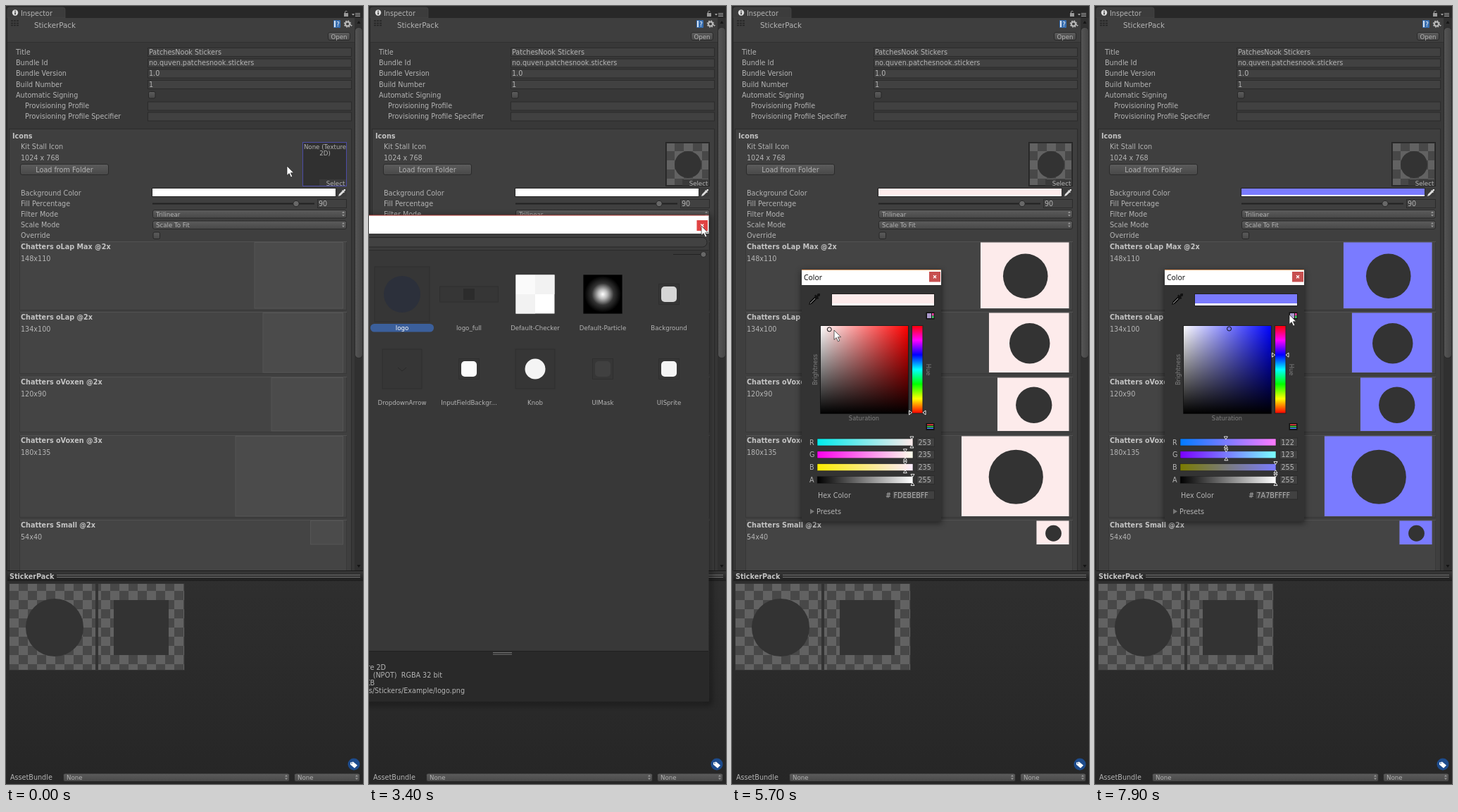
An HTML page for the animation above (8000 ms loop, 507 by 1104 pixels).

```html
<!DOCTYPE html>
<html lang="en">
<head>
<meta charset="utf-8">
<title>Sticker pack inspector</title>
<style>
html, body { margin: 0; width: 100%; height: 100%; overflow: hidden; background: #282828; }
svg { display: block; width: 100vw; height: 100vh; }
text { font: 9.65px "DejaVu Sans", sans-serif; fill: #b4b4b4; white-space: pre; }
.b { font-weight: bold; fill: #c4c4c4; }
.s { font-size: 8.65px; }
.d { font-size: 8.3px; fill: #808080; }
.h { font-size: 10.3px; }
.w { font: 10.4px "Open Sans", sans-serif; fill: #000; }
</style>
</head>
<body>
<svg id="stage" viewBox="0 0 507 1104" preserveAspectRatio="none" xmlns="http://www.w3.org/2000/svg"></svg>
<script>
const LOOP = 8000, STEP = 100;
const stage = document.getElementById('stage');
const $ = id => document.getElementById(id);
const set = (id, attrs) => { for (const k in attrs) $(id).setAttribute(k, attrs[k]); };

// Markup helpers; text is placed by its vertical middle.
const rect = (x, y, w, h, fill, more = '') =>
  `<rect x="${x}" y="${y}" width="${w}" height="${h}" fill="${fill}" ${more}/>`;
const disc = (x, y, r, fill, more = '') => `<circle cx="${x}" cy="${y}" r="${r}" fill="${fill}" ${more}/>`;
const path = (d, fill, more = '') => `<path d="${d}" fill="${fill}" ${more}/>`;
const text = (x, y, s, cls = '', more = '') => `<text x="${x}" y="${y + 3.5}" class="${cls}" ${more}>${s}</text>`;
const mid = 'text-anchor="middle"';
const edge = c => `stroke="${c}"`;
const grad = (id, stops, dir = 'x2="0" y2="1"') => `<linearGradient id="${id}" ${dir}>` +
  stops.map((c, i) => `<stop offset="${i / (stops.length - 1)}" stop-color="${c}"/>`).join('') + '</linearGradient>';
const group = (id, body) => `<g id="${id}">${body}</g>`;

const field = (x, y, w, s = '') => rect(x + .5, y - 5.5, w - 1, 12, '#414141', edge('#2b2b2b')) + text(x + 2, y, s);
const button = (x, y, w, h, s, cls = '') =>
  rect(x + .5, y + .5, w - 1, h - 1, 'url(#btn)', 'rx="2.5" ' + edge('#2a2a2a')) + text(x + w / 2, y + h / 2, s, cls, mid);
const popup = (x, y, w, s) => rect(x + .5, y - 5.5, w - 1, 11.5, 'url(#btn)', 'rx="2.5" ' + edge('#292929')) +
  text(x + 5, y, s, 's') + path(`M${x + w - 7} ${y - 1}l2 -2.5 2 2.5zm0 2l2 2.5 2 -2.5z`, '#999');
const check = (x, y) => rect(x + .5, y - 4.5, 9.5, 9.5, 'url(#btn)', 'rx="2" ' + edge('#272727'));
const closeBox = (id, x, y, w, h) => rect(x, y, w, h, '#c75050', `id="${id}"`) +
  path(`M${x + w / 2 - 2} ${y + h / 2 - 2}l4 4m0 -4l-4 4`, 'none', edge('#fff') + ' stroke-width="1.2"');
const dropper = (x, y, k, c) => path('M0 10l1 -3 5 -5 2 2 -5 5zM5 2l1 -1 1 1 1 -2 2 0 0 2 -2 1 1 1 -1 1z', c,
  `transform="translate(${x} ${y}) scale(${k})"`);

const defs = '<defs>' +
  grad('btn', ['#5c5c5c', '#484848']) + grad('thumb', ['#555', '#454545'], 'x2="1"') +
  grad('bar', ['#3a3a3a', '#1f1f1f']) + grad('pane', ['#2f2f2f', '#262626']) +
  grad('hue', ['#f00', '#f0f', '#00f', '#0ff', '#0f0', '#ff0', '#f00']) +
  '<linearGradient id="dark" x2="0" y2="1"><stop stop-opacity="0"/><stop offset="1"/></linearGradient>' +
  ['sat', 'gR', 'gG', 'gB', 'gA'].map(id => `<linearGradient id="${id}"><stop id="${id}0"/><stop id="${id}1" offset="1"/></linearGradient>`).join('') +
  '<radialGradient id="glow"><stop stop-color="#fff"/><stop offset=".25" stop-color="#bbb"/><stop offset=".6" stop-color="#333"/><stop offset="1"/></radialGradient>' +
  `<pattern id="tiles" width="26" height="26" patternUnits="userSpaceOnUse" x="5" y="817">${rect(0, 0, 26, 26, '#484848')}${rect(0, 0, 13, 13, '#626262')}${rect(13, 13, 13, 13, '#626262')}</pattern>` +
  '<filter id="soft" x="-10%" y="-10%" width="120%" height="120%"><feGaussianBlur stdDeviation="4"/></filter></defs>';

const rows = [['Title', 65, 'PatchesNook Stickers'], ['Bundle Id', 80.5, 'no.quven.patchesnook.stickers'],
  ['Bundle Version', 95.5, '1.0'], ['Build Number', 111, '1']];

// label, size, panel top, panel bottom, preview left, preview bottom
const icons = [['oLap Max @2x', '148x110', 334, 431, 353, 429], ['oLap @2x', '134x100', 434, 521, 365, 520],
  ['oVoxen @2x', '120x90', 526, 604, 377, 603], ['oVoxen @3x', '180x135', 609, 725, 326, 724],
  ['Small @2x', '54x40', 729, 801, 432.5, 764]];

function iconPanel([label, size, top, end, left, low]) {
  const y = top + 1.5, w = 478.5 - left, h = low - y;
  return rect(19.5, top + .5, 464, end - top, '#444', edge('#383838')) + path(`M20 ${top + .5}h464`, 'none', edge('#515151')) +
    text(21, top + 7, 'Chatters ' + label, 'b') + text(21, top + 24, size) +
    rect(left, y, w, h, '#4b4b4b', edge('#555')) +
    `<g class="art">${rect(left, y, w, h, '#fff', 'class="tint"')}${disc(left + w / 2 + 1, y + h / 2 + 1, h * .34, '#333')}</g>`;
}

function inspector() {
  return rect(0, 0, 507, 1104, '#282828') + rect(2, 17, 505, 785, '#383838') +
    path('M2 17V5q0 -3 3 -3H81q3 0 3 3V17z', '#3c3c3c', edge('#4a4a4a') + ' stroke-width=".6"') +
    disc(13, 9.5, 4.2, '#ddd') + rect(12.3, 8.8, 1.5, 3.4, '#333') + rect(12.3, 6.7, 1.5, 1.4, '#333') + text(21, 10, 'Inspector') +
    rect(480, 10, 6, 5, '#999') + path('M481.5 10v-2q1.5 -2 3 0', 'none', edge('#999')) +
    path('M491 11h4l-2 2.5z', '#aaa') + path('M496 10.5h7m-7 2h7m-7 2h7', 'none', edge('#999')) +
    rect(2, 17, 493, 34, '#3e3e3e') + path('M2 51.5H495', 'none', edge('#313131')) +
    path('M7 21h12M7 24.5h12M7 27.5h12', 'none', edge('#252525') + ' stroke-dasharray="3 1" stroke-width="1.6"') +
    text(40, 27, 'StickerPack', 'h') +
    rect(465, 20, 10, 11, '#376eb0', 'rx="1"') + rect(466, 21, 2, 9, '#d8e2ee') + text(471.5, 25, '?', 's', mid + ' style="fill:#fff"') +
    disc(485, 25.5, 3, 'none', 'stroke="#bbb" stroke-width="2"') + disc(485, 25.5, 4.5, 'none', 'stroke="#bbb" stroke-width="1.4" stroke-dasharray="1.8 1.73"') +
    path('M489 27h3l-1.5 2z', '#bbb') + button(457, 37, 32, 12, 'Open', 's') +
    rows.map(([a, y, b]) => text(14, y, a) + field(201, y, 290, b)).join('') +
    text(14, 126, 'Automatic Signing') + check(202, 126) +
    text(27, 141.5, 'Provisioning Profile') + field(201, 141.5, 290) +
    text(27, 156.5, 'Provisioning Profile Specifier') + field(201, 156.5, 290) +
    rect(4.5, 174.5, 486, 640, '#3f3f3f', edge('#2c2c2c')) + text(9, 184, 'Icons', 'b') +
    text(21, 199.5, 'Kit Stall Icon') + text(21, 215, '1024 x 768') + button(20, 224, 126, 16, 'Load from Folder') +
    rect(421, 193, 63, 63, '#303030') +
    group('slotNone', text(453, 199, 'None (Texture', 's', mid) + text(453, 208.5, '2D)', 's', mid)) +
    group('slotArt', rect(423, 195, 59, 59, 'url(#tiles)') + disc(453, 225, 19, '#333')) +
    rect(445, 246, 38, 9, '#3a3a3a') + text(468, 251, 'Select', 's', mid) +
    rect(421.5, 193.5, 62, 62, 'none', 'id="slotEdge"') +
    text(21, 265, 'Background Color') + rect(207.5, 258.5, 261, 12, '#fff', edge('#222')) + rect(208, 259, 260, 9, '#fff', 'class="tint"') +
    rect(468.5, 258.5, 15, 12, '#3a3a3a') + dropper(472, 260, 1, '#ddd') +
    text(21, 280, 'Fill Percentage') + path('M208 280.5H438', 'none', 'stroke="#222" stroke-width="2"') + disc(412, 280.5, 4.2, '#686868', edge('#272727')) + field(442, 280, 42, '90') +
    text(21, 295.5, 'Filter Mode') + popup(208, 295, 276, 'Trilinear') +
    text(21, 310.5, 'Scale Mode') + popup(208, 310.5, 276, 'Scale To Fit') +
    text(21, 325.5, 'Override') + check(208.5, 325.5) + icons.map(iconPanel).join('') +
    rect(495, 17, 12, 785, '#303030') + rect(495.5, 30.5, 11, 469, 'url(#thumb)', 'rx="5" ' + edge('#292929')) +
    path('M498.500 25l2.500 -4 2.500 4zM498.500 793l2.500 4 2.500 -4z', '#151515');
}

function preview() {
  return rect(0, 801, 507, 303, 'url(#pane)') + rect(2, 801, 505, 15, 'url(#bar)') + path('M2 801.500H507', 'none', edge('#191919')) +
    text(5, 809, 'StickerPack', 'b') + path('M72 807.500H503M72 810.500H503', 'none', edge('#737373')) +
    rect(4, 819, 250, 124, '#333') + rect(5, 820, 122, 122, 'url(#tiles)') + rect(131, 820, 122, 122, 'url(#tiles)') +
    disc(69, 882, 41, '#333') + rect(153, 843, 78, 78, '#333') +
    disc(494, 1076, 8.500, '#1d4b8c') + path('M489 1073.500l4 -1 6 5 -4 4 -6 -5z', '#fff') + disc(491, 1074.500, .8, '#1d4b8c') +
    text(6, 1094.500, 'AssetBundle') + popup(81, 1094.500, 322, 'None') + popup(409, 1094.500, 94, 'None');
}

const cols = [47, 142, 236, 332, 426];
function cell(i, name, half, art) {
  const x = cols[i % 5], y = i < 5 ? 409 : 515;
  return rect(x - half, y - half, 2 * half, 2 * half, '#363636', edge('#2f2f2f')) + art(x, y) +
    text(x, y + 47.500, name, 's', mid + (i ? '' : ' id="pickName"'));
}
const chip = (fill, r = 11) => (x, y) => rect(x - r, y - r, 2 * r, 2 * r, fill, 'rx="5"');

function picker() {
  const items = [
    ['logo', 39, (x, y) => disc(x, y, 26, '#2c2c2c', 'id="pickMark"')],
    ['logo_full', 0, (x, y) => rect(x - 41.500, y - 11, 83, 22, '#363636', edge('#2f2f2f')) + rect(x - 8, y - 8, 16, 16, '#2c2c2c')],
    ['Default-Checker', 27.500, (x, y) => rect(x - 27.500, y - 27.500, 55, 55, '#fff') + rect(x - 27.500, y - 27.500, 27.500, 27.500, '#fafafa') + rect(x - 27.500, y, 27.500, 27.500, '#f2f2f2') + rect(x, y - 27.500, 27.500, 27.500, '#f2f2f2')],
    ['Default-Particle', 27.500, (x, y) => rect(x - 27.500, y - 27.500, 55, 55, '#000') + disc(x, y, 26, 'url(#glow)')],
    ['Background', 14.500, chip('#d6d6d6')],
    ['DropdownArrow', 28, (x, y) => path(`M${x - 6} ${y - 2}l6 5 6 -5`, 'none', edge('#2a2a2a'))],
    ['InputFieldBackgr...', 14.500, chip('#fcfcfc')],
    ['Knob', 28, (x, y) => disc(x, y, 14.500, '#f4f4f4')],
    ['UIMask', 14.500, chip('#404040')],
    ['UISprite', 14.500, chip('#f4f4f4')]];
  return rect(-20, 300, 504, 689, 'none', 'stroke="#000" stroke-width="5" opacity=".5" filter="url(#soft)"') +
    group('pickBody', rect(0, 323, 482.500, 664, '#383838') + rect(0, 323, 482.500, 23, '#3c3c3c') +
      rect(-20, 328.500, 500, 13.500, '#424242', 'rx="6.500" ' + edge('#262626')) + path('M0 346.500H482', 'none', edge('#2a2a2a')) +
      path('M432 352.500H480', 'none', edge('#222')) + disc(475, 352.500, 4, '#686868', edge('#272727')) +
      rect(2, 451, 90, 11.500, '#3b5f9b', 'rx="5.500" id="pickPill"') +
      items.map((a, i) => cell(i, ...a)).join('') +
      rect(0, 916, 482.500, 71, '#292929') + path('M0 915.500H482', 'none', edge('#202020')) + path('M176 917.500h27m-27 2.500h27', 'none', edge('#777')) +
      group('pickInfo', [['Texture 2D', 24, 938.500], ['(NPOT)  RGBA 32 bit', 104, 949.500], ['KB', 8, 960.500], ['Assets/Stickers/Example/logo.png', 136, 971.500]]
        .map(([s, x, y]) => text(x, y, s, '', 'text-anchor="end"')).join(''))) +
    rect(0, 297, 482.500, 26, '#fff') + path('M0 297H482.500', 'none', edge('#b03a34')) + closeBox('pickClose', 465.500, 304, 15.500, 15);
}

const chans = ['R', 'G', 'B', 'A'];
function colorWindow() {
  const bars = chans.map((c, i) => {
    const y = 619 + i * 17.800;
    return text(110, y, c) + rect(121, y - 5, 136, 10, `url(#g${c})`, 'stroke="#222" stroke-width=".6"') +
      path('M-2.500 -8h5l-2.500 4zM-2.500 8h5l-2.500 -4z', '#222', `id="t${c}" stroke="#fff" stroke-width=".9"`) +
      rect(262.500, y - 6, 25, 12, '#414141', edge('#2b2b2b')) + text(264.500, y, '', '', `id="n${c}"`);
  }).join('');
  const mini = y => rect(275.500, y, 12, 10, '#111');
  return rect(98, 376, 200, 358, '#000', 'opacity=".5" filter="url(#soft)"') + rect(99, 374, 198, 357.500, '#333') +
    rect(99, 374, 198, 22, '#fff') + path('M99 374.500H297', 'none', edge('#e39a63')) + text(102, 385, 'Color', 'w') + closeBox('colClose', 280, 377, 16, 14.500) +
    dropper(109, 408, 1.600, '#111') + path('M111 422l7 -7', 'none', edge('#aaa')) +
    rect(141.500, 408.500, 146, 17, '#fff', edge('#222')) + rect(142, 409, 145, 13, '#fff', 'class="tint"') +
    mini(434.500) + rect(277, 436, 6, 7, '#a9c') + rect(284, 436, 2.500, 3.500, '#f4a') + rect(284, 439.500, 2.500, 3.500, '#4c6') +
    rect(125.500, 453.500, 125, 125, 'url(#sat)', edge('#222')) + rect(125.500, 453.500, 125, 125, 'url(#dark)') +
    disc(0, 0, 3, 'none', 'id="ring" stroke="#111"') +
    rect(255.500, 453.500, 15.500, 124.500, 'url(#hue)', edge('#222')) +
    path('M251.500 -3v6l4 -3zM275 -3v6l-4 -3z', '#222', 'id="huePin" stroke="#fff" stroke-width=".9"') +
    text(0, 0, 'Brightness', 'd', mid + ' transform="translate(117.500 516) rotate(-90)"') +
    text(0, 0, 'Hue', 'd', mid + ' transform="translate(279.500 516) rotate(90)"') + text(187.500, 584.500, 'Saturation', 'd', mid) +
    mini(592) + ['#f44', '#4d4', '#48f'].map((c, i) => rect(277, 593.500 + i * 2.500, 9, 1.500, c)).join('') + bars +
    text(122, 694, 'Hex Color') + text(218, 694, '#') + rect(227.500, 688, 60, 12, '#414141', edge('#2b2b2b')) + text(229.500, 694, '', '', 'id="hex"') +
    path('M111 713.500v7.500l6 -3.700z', '#777') + text(120, 717.500, 'Presets');
}

stage.innerHTML = defs + inspector() + preview() + group('picker', picker()) + group('colors', colorWindow()) +
  path('M0 0V13.500L3.200 10.600 5.600 16 7.800 15 5.400 9.800H9.600z', '#fff', 'id="cursor" stroke="#222" stroke-width=".7"');

// time, x, y of the pointer
const moves = [[0, 399, 227], [400, 440, 223], [700, 457, 228], [1200, 457, 228], [1500, 470, 255], [2000, 470, 255],
  [2700, 45, 413], [2900, 45, 413], [3300, 468, 305], [3400, 472, 312], [3600, 480, 313], [3800, 477, 311], [3900, 475, 310], [4300, 401, 264],
  [4600, 401, 264], [5000, 190, 554], [5300, 130, 459], [5400, 130, 459], [5700, 145, 460], [5900, 156, 459], [6100, 253, 517],
  [6200, 253, 517], [6400, 263, 495], [6600, 263, 495], [6900, 155, 459], [7100, 174, 460], [7400, 190, 458], [7500, 190, 458],
  [7600, 196, 540], [7700, 265, 555], [7800, 291, 398], [7900, 276, 438]];
// time, saturation, brightness
const shades = [[5400, 0, 1], [5700, .071, .992], [5900, .2, 1], [6900, .2, 1], [7100, .382, .984], [7400, .522, 1]];

function at(keys, t) {
  const i = keys.findIndex(k => k[0] > t);
  if (i < 0) return keys[keys.length - 1].slice(1);
  if (!i) return keys[0].slice(1);
  const a = keys[i - 1], b = keys[i], p = (t - a[0]) / (b[0] - a[0]);
  return a.slice(1).map((v, j) => v + (b[j + 1] - v) * p);
}
const hsv = (h, s, v) => [5, 3, 1].map(n => {
  const k = (n + h * 6) % 6;
  return Math.round(255 * v * (1 - s * Math.max(0, Math.min(k, 4 - k, 1))));
});
const css = c => `rgb(${c.slice(0, 3).join()})`;
const show = (id, on) => set(id, { visibility: on ? 'inherit' : 'hidden' });

function draw(t) {
  const [x, y] = at(moves, t), [s, v] = at(shades, t);
  const hue = t >= 6600 ? .665 : 0;
  const rgba = [...hsv(hue, s, v), 255];
  const picked = t >= 2800, color = t >= 4500;

  set('cursor', { transform: `translate(${x} ${y})` });
  show('slotNone', !picked);
  show('slotArt', picked);
  const focus = t < 1500 || (t >= 3900 && !color);
  set('slotEdge', { stroke: focus ? '#4c4ca6' : '#232323' });
  stage.querySelectorAll('.art').forEach(e => e.setAttribute('visibility', picked ? 'visible' : 'hidden'));
  stage.querySelectorAll('.tint').forEach(e => e.setAttribute('fill', css(rgba)));

  show('picker', t >= 1600 && t < 3900);
  show('pickBody', t >= 1700);
  show('pickPill', picked);
  show('pickInfo', picked);
  set('pickMark', { fill: picked ? '#2c303b' : '#2c2c2c' });
  $('pickName').style.fill = picked ? '#fff' : '';
  set('pickClose', { fill: t >= 3300 ? '#e04343' : '#c75050' });

  show('colors', color);
  set('sat0', { 'stop-color': '#fff' });
  set('sat1', { 'stop-color': css(hsv(hue, 1, 1)) });
  set('ring', { cx: 130 + s * 116, cy: 458 + (1 - v) * 116 });
  set('huePin', { transform: `translate(0 ${577 - hue * 123})` });
  chans.forEach((c, i) => {
    const ends = [0, 255].map(n => i < 3 ? rgba.map((m, j) => j === i ? n : m) : [n, n, n]);
    set(`g${c}0`, { 'stop-color': css(ends[0]) });
    set(`g${c}1`, { 'stop-color': css(ends[1]) });
    set('t' + c, { transform: `translate(${121 + rgba[i] / 255 * 135.500} ${619 + i * 17.800})` });
    $('n' + c).textContent = rgba[i];
  });
  $('hex').textContent = rgba.map(n => n.toString(16).padStart(2, '0')).join('').toUpperCase();
}

const start = performance.now();
function tick() {
  const t = (performance.now() - start) % LOOP;
  draw(Math.floor(t / STEP) * STEP);
  requestAnimationFrame(tick);
}
tick();
</script>
</body>
</html>
```
